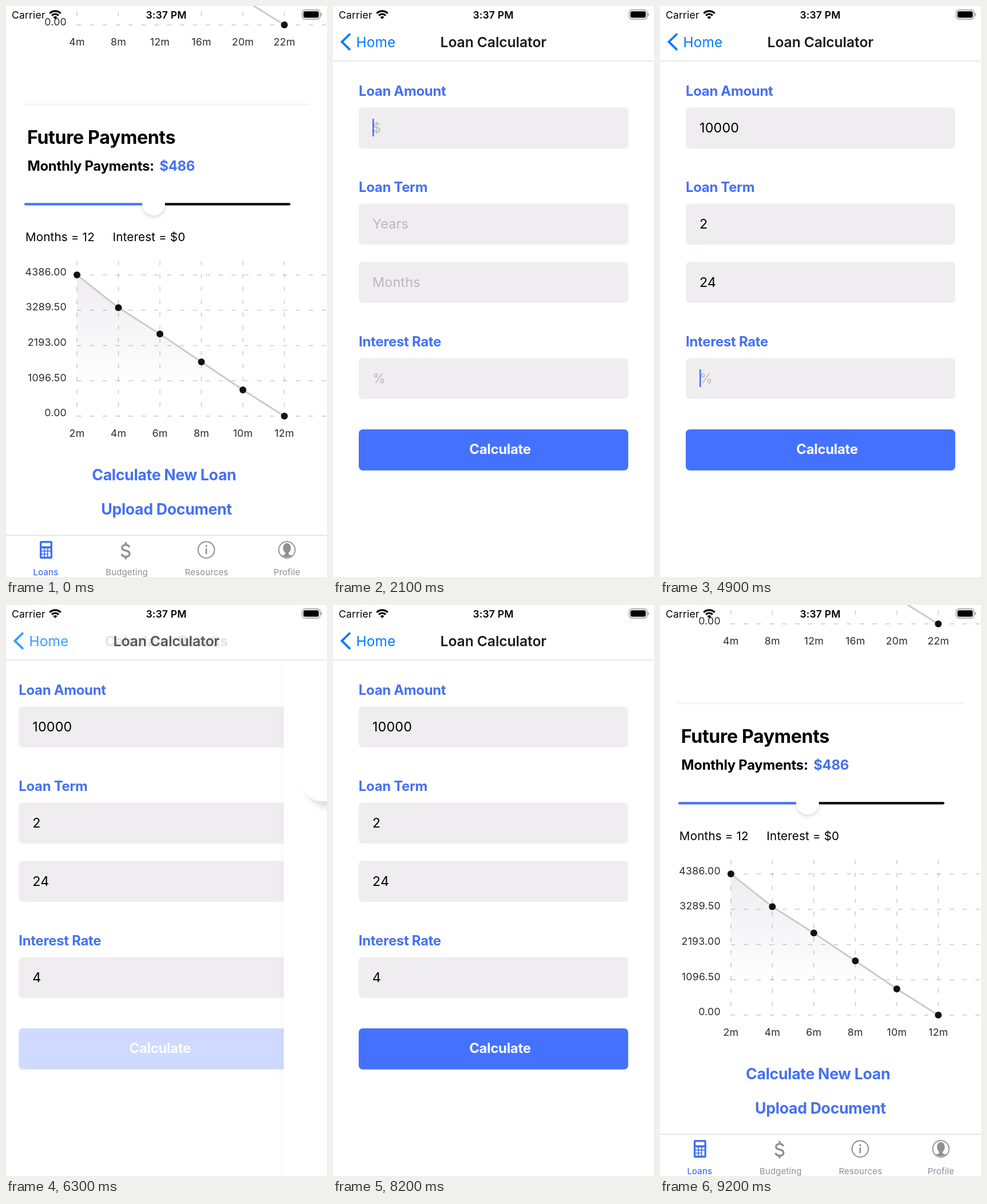
These frames come from a looping animation (561 by 998 pixels, 9300 ms). An HTML page with a canvas:

```html
<!DOCTYPE html>
<html lang="en">
<head>
<meta charset="utf-8">
<title>Loan calculator</title>
<style>
html, body { margin: 0; width: 100%; height: 100%; overflow: hidden; background: #fff; }
canvas { display: block; width: 561px; height: 998px; }
</style>
</head>
<body>
<canvas id="stage"></canvas>
<script>
const W = 561, H = 998, LOOP = 9300, STEP = 100;
const BLUE = '#4470f4', FILL = '#4472ff', LINK = '#007aff', GRAY = '#8e8e93';
const canvas = document.getElementById('stage');
const ctx = canvas.getContext('2d');
const ratio = window.devicePixelRatio || 1;
canvas.width = W * ratio;
canvas.height = H * ratio;

// ---- helpers ----
const clamp = v => Math.min(1, Math.max(0, v));
const ease = u => (u = clamp(u), u < .5 ? 2 * u * u : 1 - 2 * (1 - u) ** 2);

// critically damped spring, 0 to 1
function spring(ms) {
  const x = Math.max(0, ms) * .01826;
  return 1 - Math.exp(-x) * (1 + x);
}

// opacity of a touched control
const touch = (t, down, up) => 1 - .8 * ease((t - down) / 150) + .8 * ease((t - up) / 250);

function tracking(size, weight) {
  if (size < 19) return .012;
  return weight === 700 ? -.012 : weight === 600 ? -.004 : .008;
}

function setFont(size, weight) {
  ctx.font = `${weight} ${size}px Inter, "Liberation Sans", sans-serif`;
  ctx.letterSpacing = (tracking(size, weight) * size).toFixed(3) + 'px';
}

function text(str, x, y, size, color = '#000', weight = 400, align = 'left') {
  setFont(size, weight);
  ctx.textAlign = align;
  ctx.fillStyle = color;
  ctx.fillText(str, x, y);
}

function box(x, y, w, h, r, color) {
  ctx.fillStyle = color;
  ctx.beginPath();
  ctx.roundRect(x, y, w, h, r);
  ctx.fill();
}

function line(points, color, width, dash = []) {
  ctx.strokeStyle = color;
  ctx.lineWidth = width;
  ctx.setLineDash(dash);
  ctx.beginPath();
  points.forEach(([x, y]) => ctx.lineTo(x, y));
  ctx.stroke();
  ctx.setLineDash([]);
}

function dot(x, y, r, color) {
  ctx.fillStyle = color;
  ctx.beginPath();
  ctx.arc(x, y, r, 0, 7);
  ctx.fill();
}

function ring(x, y, r, width, color) {
  ctx.strokeStyle = color;
  ctx.lineWidth = width;
  ctx.beginPath();
  ctx.arc(x, y, r, 0, 7);
  ctx.stroke();
}

function group(draw, dx = 0, alpha = 1) {
  if (alpha <= .002) return;
  ctx.save();
  ctx.translate(dx, 0);
  ctx.globalAlpha *= alpha;
  draw();
  ctx.restore();
}

function shadow(color, blur, dx, dy) {
  ctx.shadowColor = color;
  ctx.shadowBlur = blur * ratio;
  ctx.shadowOffsetX = dx * ratio;
  ctx.shadowOffsetY = dy * ratio;
}

// ---- status bar ----
function statusBar() {
  text('Carrier', 10, 21.5, 17.5);
  text('3:37 PM', 280, 21.5, 17.5, '#000', 600, 'center');
  ctx.strokeStyle = '#000';
  ctx.lineWidth = 3.2;
  for (const r of [8.4, 13.6]) {
    ctx.beginPath();
    ctx.arc(86, 22.5, r, -Math.PI * .75, -Math.PI * .25);
    ctx.stroke();
  }
  ctx.fillStyle = '#000';
  ctx.beginPath();
  ctx.moveTo(86, 23);
  ctx.arc(86, 23, 5, -Math.PI * .75, -Math.PI * .25);
  ctx.fill();
  ctx.strokeStyle = '#9a9a9a';
  ctx.lineWidth = 1.4;
  ctx.beginPath();
  ctx.roundRect(517.5, 6.8, 31.5, 16.2, 5);
  ctx.stroke();
  box(519.8, 9.2, 26.8, 11.4, 3, '#000');
  box(550.4, 12.4, 1.8, 5, [0, 2, 2, 0], '#9a9a9a');
}

// ---- loans screen ----
const LEFT = 124, GAP = 72.5, RIGHT = 559, SPAN = 271, ROW = 61.7;

function chart(bottom, ys, months, labels) {
  const xs = months.map((m, i) => LEFT + i * GAP);
  const points = ys.map((y, i) => [xs[i], y]);
  const grid = 'rgba(0,0,0,.21)', dash = [7.5, 15];
  const area = ctx.createLinearGradient(0, bottom - 247, 0, bottom - 50);
  area.addColorStop(0, 'rgba(55,35,70,.088)');
  area.addColorStop(1, 'rgba(55,35,70,0)');
  ctx.fillStyle = area;
  ctx.beginPath();
  ctx.moveTo(LEFT, bottom);
  points.forEach(p => ctx.lineTo(...p));
  ctx.fill();

  labels.forEach((s, i) => {
    const y = bottom - i * ROW;
    line([[LEFT, y], [RIGHT, y]], grid, 1.5, dash);
    text(s, 106, y + .5, 17.8, '#2c2c2c', 400, 'right');
  });
  xs.forEach((x, i) => {
    line([[x, bottom - SPAN], [x, bottom]], grid, 1.5, dash);
    text(months[i] + 'm', x, bottom + 36.3, 17.8, '#2c2c2c', 400, 'center');
  });
  line(points, '#c9c9c9', 2.8);
  points.forEach(p => dot(...p, 6, '#111'));
}

function slider() {
  ctx.lineCap = 'round';
  line([[258, 346.4], [495, 346.4]], '#000', 4.3);
  line([[34, 346.4], [258, 346.4]], FILL, 4.3);
  ctx.lineCap = 'butt';
  ctx.save();
  shadow('rgba(0,0,0,.17)', 6, 0, 2.5);
  ctx.beginPath();
  ctx.rect(230, 349, 56, 40);
  ctx.clip();
  dot(258, 346, 20, '#fff');
  ctx.restore();
  dot(258, 346, 20, '#fff');
}

function dollar(x, y) {
  ctx.save();
  ctx.translate(x, y);
  ctx.strokeStyle = GRAY;
  ctx.lineWidth = 3.3;
  ctx.stroke(new Path2D(`M6.5 -6 C5.4 -9 3 -10.2 0 -10.2 C-4 -10.2 -6.4 -8.2 -6.4 -5.2
    C-6.4 2 6.8 -2.2 6.8 5.2 C6.8 8.6 4 10.4 0 10.4 C-4 10.4 -6.4 8.8 -7 5.6
    M0 -15 V-10 M0 10 V15`));
  ctx.restore();
}

function tabBar() {
  box(0, 924.5, W, 74, 0, '#fff');
  box(0, 924.5, W, 1.2, 0, '#dadada');

  box(59, 935, 22, 31, 2.5, BLUE);
  box(62.3, 938.6, 15.4, 5.6, 1, '#fff');
  for (let r = 0; r < 3; r++)
    for (let c = 0; c < 3; c++)
      if (c < 2 || r !== 2)
        box(62.3 + c * 5.7, 948 + r * 5.4, 4, c === 2 && r === 1 ? 9.2 : 3.8, .8, '#fff');

  dollar(209.2, 952);

  ring(350, 950.5, 14.3, 2, GRAY);
  dot(350, 944, 1.8, GRAY);
  box(348.7, 948, 2.6, 10.2, .6, GRAY);

  ring(491, 950.5, 14.3, 1.8, GRAY);
  ctx.save();
  ctx.beginPath();
  ctx.arc(491, 950.5, 13, 0, 7);
  ctx.clip();
  ctx.fillStyle = GRAY;
  ctx.beginPath();
  ctx.ellipse(491, 947.5, 6.8, 8.8, 0, 0, 7);
  ctx.ellipse(491, 965.5, 12.5, 7, 0, 0, 7);
  ctx.rect(488, 954, 6, 7);
  ctx.fill();
  ctx.restore();

  [['Loans', 69.5], ['Budgeting', 211], ['Resources', 350.5], ['Profile', 491]].forEach(([s, x], i) =>
    text(s, x, 994.5, 14.9, i ? GRAY : BLUE, i ? 400 : 500, 'center'));
}

function loansScreen(t) {
  box(0, 0, W, H, 0, '#fff');
  chart(33, [-214, -168, -124, -68, -12, 33], [4, 8, 12, 16, 20, 22], ['0.00']);
  box(30, 170.5, 500.5, 3, 0, '#f5f5f6');
  text('Future Payments', 37, 241, 32.2, '#000', 700);
  text('Monthly Payments:', 37.5, 287.5, 23.9, '#000', 700);
  text('$486', 330, 287.5, 23.9, BLUE, 700, 'right');
  slider();
  text('Months = 12', 34, 411, 20.6);
  text('Interest = $0', 186.5, 411, 20.6);
  chart(716.8, [470, 527.3, 573.3, 622, 671, 716.8], [2, 4, 6, 8, 10, 12],
    ['0.00', '1096.50', '2193.00', '3289.50', '4386.00']);
  group(() => text('Calculate New Loan', 276.3, 828.5, 26.7, BLUE, 700, 'center'),
    0, touch(t, 730, 880));
  text('Upload Document', 280.5, 889, 26.7, BLUE, 700, 'center');
  tabBar();
}

// ---- calculator screen ----
const FIELDS = [
  { y: 177.5, hint: '$', value: '10000', start: 2800 },
  { y: 345.5, hint: 'Years', value: '2', start: 3800 },
  { y: 447.2, hint: 'Months', value: '24', start: 4300 },
  { y: 615.5, hint: '%', value: '4', start: 5400 }
];
// caret: from, to, field
const CARET = [[2100, 2500, 0], [2800, 3400, 0], [3700, 4000, 1], [4000, 4900, 2], [4900, 5800, 3]];

function field({ y, hint, value, start }, t, active) {
  const typed = value.slice(0, Math.max(0, Math.floor((t - start) / STEP) + 1));
  box(45, y, 471, 71.5, 7, '#efedf0');
  text(typed || hint, 69, y + 43.5, 23.3, typed ? '#000' : '#bab8bc');
  if (active) box(69 + ctx.measureText(typed).width, y + 19.5, 2.6, 31, 1, BLUE);
}

function calculatorScreen(t) {
  const caret = CARET.find(([from, to]) => t >= from && t < to);
  [['Loan Amount', 156.5], ['Loan Term', 325], ['Interest Rate', 595]].forEach(([s, y]) =>
    text(s, 45, y, 23.9, BLUE, 700));
  FIELDS.forEach((f, i) => field(f, t, caret && caret[2] === i));
  group(() => box(45, 740, 471, 71.7, 7, FILL), 0, touch(t, 6075, 6250));
  text('Calculate', 292, 782.7, 23.9, '#fff', 700, 'center');
}

// ---- results screen ----
function resultsScreen() {
  ctx.save();
  shadow('rgba(45,30,60,.165)', 11, 10, 10);
  box(30, 142, 501, 201, 37, '#fff');
  ctx.restore();
  text('Monthly Payments', 280.5, 214.5, 29.2, BLUE, 700, 'center');
  text('$434.25', 281, 275.7, 31.9, '#000', 400, 'center');
  text('Total Paid', 150, 461.5, 28.7, BLUE, 700, 'center');
  text('Total Interest', 435, 461.5, 28.7, BLUE, 700, 'center');
  text('$10422.00', 150, 542.3, 29, '#000', 400, 'center');
  text('$422.00', 435.5, 542.3, 29, '#000', 400, 'center');
  box(295.4, 432.5, 1.5, 116.5, 0, '#808080');
}

// ---- header and stack ----
function headerItems(title, back, alpha, pressed) {
  group(() => text(title, 280.3, 71.5, 24.7, '#1c1c1e', 600, 'center'), 0, alpha);
  group(() => {
    line([[30, 48.5], [15.5, 62.7], [30, 76.9]], LINK, 3.8);
    text(back, 40.5, 71.5, 24.3, LINK);
  }, 0, alpha * pressed);
}

function header(t, p) {
  box(0, 0, W, 96, 0, '#fff');
  box(0, 95.5, W, 1.2, 0, '#dedede');
  headerItems('Calculator Results', 'Back', p, touch(t, 7550, 7700));
  headerItems('Loan Calculator', 'Home', clamp(1 - 2 * p), touch(t, 8550, 8700));
}

function card(p, draw) {
  group(() => {
    ctx.save();
    if (p < .999) shadow(`rgba(0,0,0,${.3 * p})`, 15, -1.5, 1.5);
    box(0, 0, W, H, 0, '#fff');
    ctx.restore();
    draw();
  }, (1 - p) * W);
}

function render(t) {
  const calc = spring(t - 880) - spring(t - 8680);
  const result = spring(t - 6265) - spring(t - 7680);
  ctx.setTransform(ratio, 0, 0, ratio, 0, 0);
  box(0, 0, W, H, 0, '#fff');
  if (calc < .9995) group(() => loansScreen(t), -.3 * W * calc);
  if (calc > .0005) {
    card(calc, () => {
      group(() => calculatorScreen(t), -.3 * W * result);
      if (result > .0005) card(result, resultsScreen);
      header(t, result);
    });
  }
  statusBar();
}

const began = performance.now();
function tick() {
  const t = (performance.now() - began) % LOOP;
  render(Math.floor(t / STEP) * STEP);
  requestAnimationFrame(tick);
}
tick();
</script>
</body>
</html>
```
